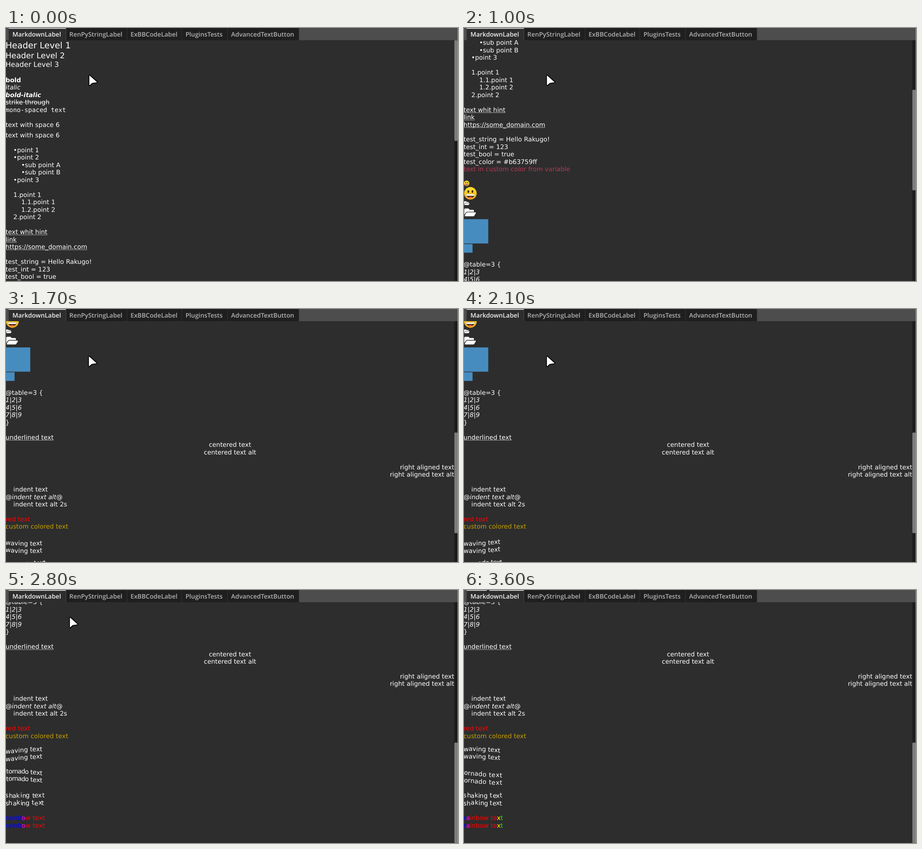
Write an HTML page with a canvas that moves like this. It is 999 px wide and 560 px high and loops after 3700 ms.

```html
<!DOCTYPE html>
<html>
<head>
<meta charset="utf-8">
<style>
html, body { margin: 0; height: 100%; overflow: hidden; background: #2d2d2d; }
canvas { display: block; }
</style>
</head>
<body>
<canvas id="stage" width="999" height="560"></canvas>
<script>
const ctx = document.getElementById('stage').getContext('2d');
const LOOP = 3700, SCALE = 999 / 1152, MAX_SCROLL = 885;
const LEFT = -1.2, INDENT = 20;
const SANS = '"DejaVu Sans", sans-serif', MONO = '"DejaVu Sans Mono", monospace';
const SCROLL = [[500, 78], [600, 234], [1000, 312], [1100, 390], [1200, 468],
  [1600, 546], [1700, 702], [2200, 780], [2300, MAX_SCROLL]];
const POINTER = [[2700, 183, 105.7], [2800, 141, 61.7], [3000, 75, 5], [3300, 54, -9], [3600, 52, -20]];
const TABS = [[6, 126, 'MarkdownLabel', 14.2], [133, 134, 'RenPyStringLabel', 140.1],
  [268, 120, 'ExBBCodeLabel', 275.2], [389, 100, 'PluginsTests', 396.7],
  [490, 157, 'AdvancedTextButton', 497.6]];
const FOLDER = new Path2D('M0 390V112Q0 64 48 64H208L272 128H432Q480 128 480 176V224H152Q97 224 69 272Z' +
  'M97 288Q115 256 152 256H552Q584 262 573 292L500 416Q482 448 445 448H45Q14 440 24 412Z');
const ARROW = new Path2D('M.8 0V20.5L6.2 15.6L16.5 14Z');

// Each line: text, baseline advance from the previous line, options.
const L = 19, GAP = 38;
const LINES = [
  ['Header Level 1', 52, { size: 22 }], ['Header Level 2', 25, { size: 20 }], ['Header Level 3', 22, { size: 18 }],
  ['bold', 39, { style: 'bold' }], ['italic', L, { style: 'italic' }], ['bold-italic', L, { style: 'italic bold' }],
  ['strike through', L, { line: -5.6 }], ['mono-spaced text', L, { family: MONO }],
  ['text with space 6', GAP], ['text with space 6', 27],
  ['•point 1', GAP, { x: INDENT }], ['•point 2', L, { x: INDENT }],
  ['•sub point A', L, { x: 2 * INDENT }], ['•sub point B', L, { x: 2 * INDENT }], ['•point 3', L, { x: INDENT }],
  ['1.point 1', GAP, { x: INDENT }], ['1.1.point 1', L, { x: 2 * INDENT }],
  ['1.2.point 2', L, { x: 2 * INDENT }], ['2.point 2', L, { x: INDENT }],
  ['text whit hint', GAP, { line: 1.6 }], ['link', L, { line: 1.6 }], ['https://some_domain.com', L, { line: 1.6 }],
  ['test_string = Hello Rakugo!', GAP], ['test_int = 123', L], ['test_bool = true', L],
  ['test_color = #b63759ff', L], ['text in custom color from variable', L, { color: '#b63759' }],
  ['@table=3 {', 243], ['1|2|3', L, { style: 'italic' }], ['4|5|6', L, { style: 'italic' }],
  ['7|8|9', L, { style: 'italic' }], ['}', L],
  ['underlined text', GAP, { line: 1.6 }],
  ['centered text', L, { align: 'center', x: 572.2 }], ['centered text alt', L, { align: 'center', x: 572.2 }],
  ['right aligned text', GAP, { align: 'right', x: 1143.5 }], ['right aligned text alt', L, { align: 'right', x: 1143.5 }],
  ['indent text', GAP, { x: INDENT }], ['@', L], ['indent text alt', 0, { x: 16, style: 'italic' }],
  ['@', 0, { x: 129.6 }], ['indent text alt 2s', L, { x: INDENT }],
  ['red text', GAP, { color: '#f00' }], ['custom colored text', L, { color: '#c4a000' }],
  ['waving text', GAP, { fx: wave }], ['waving text', L, { fx: wave }],
  ['tornado text', GAP, { fx: tornado }], ['tornado text', L, { fx: tornado }],
  ['shaking text', GAP, { fx: shake }], ['shaking text', L, { fx: shake }],
  ['rainbow text', GAP, { fx: rainbow }], ['rainbow text', L, { fx: rainbow }]
];

// Letter effects take (x, seconds, letter index, baseline) and return [dx, dy, color].
function phase(x, t) { return 2 * t - 2.85 + x / 50; }
function wave(x, t) { return [0, 5 * Math.sin(phase(x, t))]; }
function tornado(x, t) { return [5 * Math.sin(phase(x, t)), 5 * Math.cos(phase(x, t))]; }
function shake(x, t, i, y) {
  const r = Math.sin(Math.round(t * 10) * 12.99 + i * 78.23 + y * 3.7) * 43758.5453;
  const a = (r - Math.floor(r)) * 2 * Math.PI;
  return [Math.sin(a), Math.cos(a)];
}
// Oversaturated HSV: channels clip to nearly pure primaries.
function rainbow(x, t) {
  const h = (1.2 * t + 0.56 + 0.024 * x) % 6, f = h % 1;
  const v = 20, p = -180, q = v * (1 - 10 * f), u = v * (1 - 10 * (1 - f));
  const rgb = [[v, u, p], [q, v, p], [p, v, u], [p, q, v], [u, p, v], [v, p, q]][Math.floor(h)];
  return [0, 0, `rgb(${rgb.map(c => Math.round(255 * Math.min(1, Math.max(0, c))))})`];
}

function box(color, x, y, w, h) {
  ctx.fillStyle = color;
  ctx.fillRect(x, y, w, h);
}

function ellipse(color, x, y, rx, ry, end = 2 * Math.PI) {
  ctx.fillStyle = color;
  ctx.beginPath();
  ctx.ellipse(x, y, rx, ry, 0, 0, end);
  ctx.fill();
}

function drawLine(text, y, t, o = {}) {
  const { x = 0, size = 16, style = '', family = SANS, color = '#fff', align = 'left', line, fx } = o;
  ctx.font = `${style} ${size}px ${family}`;
  ctx.textAlign = align;
  ctx.fillStyle = color;
  if (fx) {
    [...text].forEach((c, i) => {
      const left = ctx.measureText(text.slice(0, i)).width;
      const [dx, dy, tint] = fx(left, t, i, y);
      ctx.fillStyle = tint || color;
      ctx.fillText(c, left + dx, y + dy);
    });
  } else ctx.fillText(text, x, y);
  if (line) box('rgba(255,255,255,.7)', x, y + line, ctx.measureText(text).width, 1);
}

function drawSmiley(x, y, r) {
  ctx.save();
  ctx.translate(x, y);
  ctx.scale(r / 16, r / 16);
  const skin = ctx.createLinearGradient(0, -16, 0, 16);
  skin.addColorStop(0, '#fde030');
  skin.addColorStop(0.6, '#fcc21b');
  skin.addColorStop(1, '#f5a01c');
  ellipse(skin, 0, 0, 16, 16);
  ellipse('#422b0d', -5.3, -4.5, 2.2, 3.4);
  ellipse('#422b0d', 5.3, -4.5, 2.2, 3.4);
  ellipse('#422b0d', 0, 2, 11, 10, Math.PI);
  ctx.clip();
  box('#fff', -11, 2, 22, 4.2);
  ellipse('#ed4d5d', 0, 12, 6, 3.5);
  ctx.restore();
}

function drawFolder(x, y, w) {
  ctx.save();
  ctx.translate(x, y);
  ctx.scale(w / 576, w / 576);
  ctx.fillStyle = '#fff';
  ctx.fill(FOLDER);
  ctx.restore();
}

function drawContent(scroll, t) {
  ctx.save();
  ctx.beginPath();
  ctx.rect(0, 27, 999, 533);
  ctx.clip();
  ctx.scale(SCALE, SCALE);
  ctx.translate(LEFT, -scroll);
  let y = 0;
  for (const [text, advance, options] of LINES) drawLine(text, y += advance, t, options);
  drawSmiley(8, 708.5, 7);
  drawSmiley(17.5, 734, 16);
  drawFolder(1.5, 752.8, 14);
  drawFolder(2, 769.5, 29.5);
  box('#478cbf', 0, 800, 63, 62);
  box('#478cbf', 0, 863.5, 23, 22);
  ctx.restore();
}

function drawTabs() {
  box('#4d4d4d', 0, 0, 999, 27);
  ctx.font = '600 13.875px "Open Sans", sans-serif';
  ctx.textAlign = 'left';
  TABS.forEach(([x, w, name, textX], i) => {
    box(i ? '#1f1f1f' : '#2d2d2d', x, 0, w, 27);
    if (i) box('#343434', x + w, 0, 1, 27);
    else box('#e0e0e0', x, 0, w, 1.6);
    ctx.fillStyle = i ? '#b2b2b2' : '#f2f2f2';
    ctx.fillText(name, textX, 19);
  });
}

function drawScrollbar(scroll) {
  box('#1c1c1c', 991, 27, 7, 533);
  ctx.fillStyle = '#7c7c7c';
  ctx.beginPath();
  ctx.roundRect(991, 27 + scroll / MAX_SCROLL * 310.5, 7, 223, 2.5);
  ctx.fill();
  box('#9a9a9a', 998, 0, 1, 560);
}

function pointerAt(ms) {
  if (ms < 200) return [184, 105.7];
  const next = POINTER.findIndex(p => p[0] >= ms);
  if (next < 1) return POINTER[0].slice(1);
  const [t0, x0, y0] = POINTER[next - 1], [t1, x1, y1] = POINTER[next];
  const k = (ms - t0) / (t1 - t0);
  return [x0 + (x1 - x0) * k, y0 + (y1 - y0) * k];
}

function drawPointer(x, y) {
  ctx.save();
  ctx.translate(x, y);
  ctx.lineJoin = 'round';
  ctx.strokeStyle = '#000';
  ctx.lineWidth = 4.6;
  ctx.stroke(ARROW);
  ctx.strokeStyle = ctx.fillStyle = '#fff';
  ctx.lineWidth = 1;
  ctx.fill(ARROW);
  ctx.stroke(ARROW);
  ctx.restore();
}

function draw(now) {
  const ms = Math.floor(now % LOOP / 100) * 100;
  const scroll = SCROLL.reduce((s, [at, pos]) => ms >= at ? pos : s, 0);
  ctx.textRendering = 'geometricPrecision';
  box('#2d2d2d', 0, 0, 999, 560);
  drawContent(scroll, ms / 1000);
  drawTabs();
  drawScrollbar(scroll);
  drawPointer(...pointerAt(ms));
}

const start = performance.now();
function tick() {
  draw(performance.now() - start);
  requestAnimationFrame(tick);
}
tick();
</script>
</body>
</html>
```
